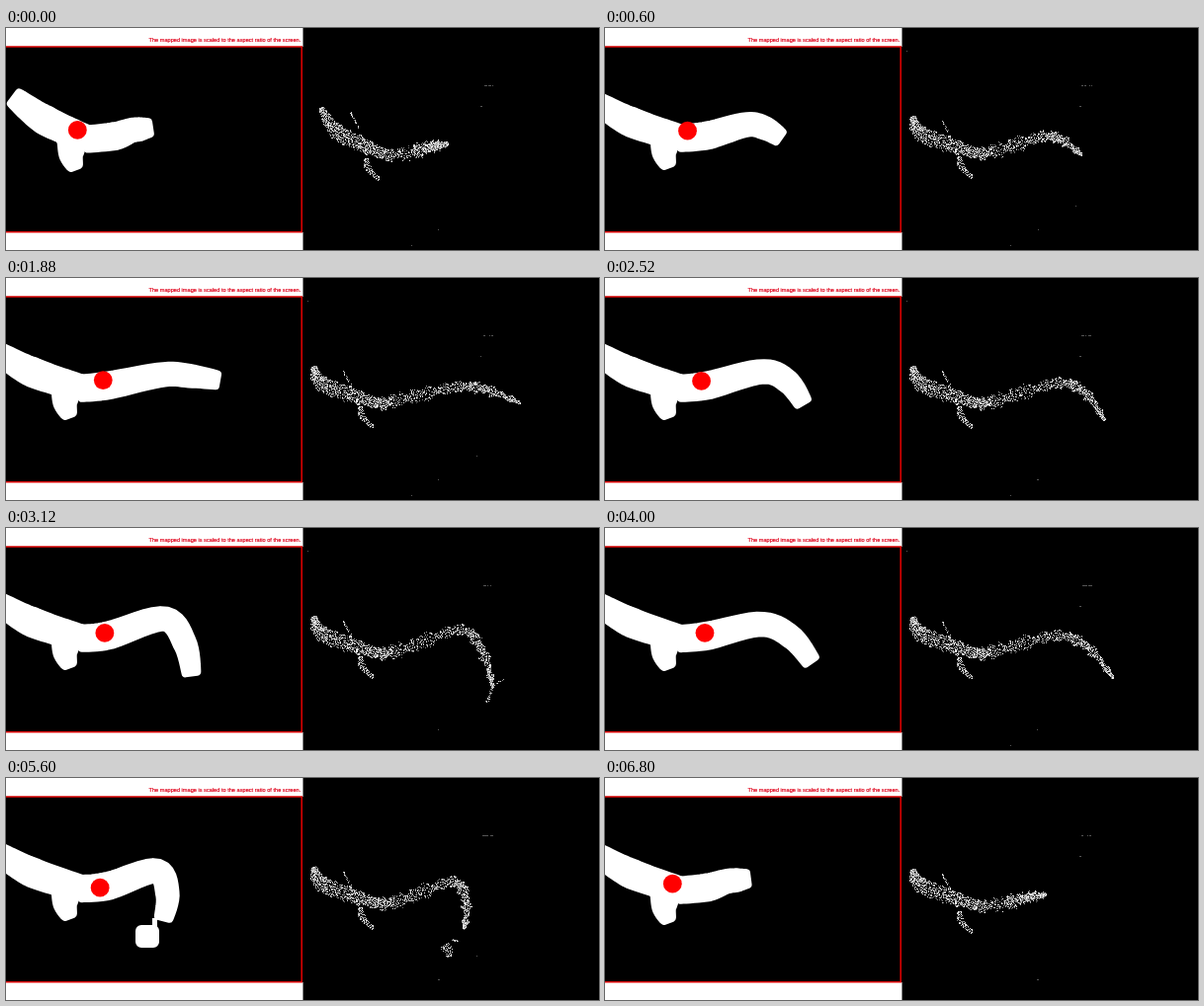
Animation, 600 px wide and 225 px high, one loop 6.84 s. Source, as an HTML page with a canvas:

```html
<!DOCTYPE html>
<html lang="en">
<head>
<meta charset="utf-8">
<title>Mapped silhouette and point cloud</title>
<style>
  html, body { margin: 0; width: 100%; height: 100%; overflow: hidden; background: #000; }
  canvas, svg { position: absolute; left: 0; top: 0; width: 600px; height: 225px; }
  text {
    font-family: "Liberation Sans", Arial, sans-serif; font-size: 5.63px;
    fill: #e0001a; stroke: #e0001a; stroke-width: 0.18px;
  }
</style>
</head>
<body>
<canvas id="stage" width="600" height="225"></canvas>
<svg viewBox="0 0 600 225">
  <path d="M0 19H299.2V206.8H0" fill="none" stroke="#d80000" stroke-width="1.6"/>
  <text x="298.3" y="13.7" text-anchor="end">The mapped image is scaled to the aspect ratio of the screen.</text>
</svg>
<script>
const LOOP = 6840, STEP = 40;
const ctx = document.getElementById('stage').getContext('2d', { willReadFrequently: true });

const POSES = [
  { t: 0, drop: 4, elbow: [126, 104], tip: [146, 101] },
  { t: 1200, drop: 0, elbow: [160, 92], tip: [210, 122] },
  { t: 1880, drop: 2, elbow: [158, 98], tip: [216, 104] },
  { t: 3120, drop: 2, elbow: [160, 92], tip: [188, 150] },
  { t: 4000, drop: 3, elbow: [158, 97.5], tip: [210, 137] },
  { t: 5600, drop: 3, elbow: [152, 94], tip: [159, 144] },
  { t: 6800, drop: 7, elbow: [122, 105], tip: [145, 102] }
];

const mix = (a, b, k) => a + (b - a) * k;
const mixPoint = (p, q, k) => [mix(p[0], q[0], k), mix(p[1], q[1], k)];
const shift = (p, dx, dy) => [p[0] + dx, p[1] + dy];
const clamp = v => Math.max(0, Math.min(1, v));

function random(seed) {
  return () => {
    seed = (seed + 0x6D2B79F5) | 0;
    let r = Math.imul(seed ^ (seed >>> 15), 1 | seed);
    r = (r + Math.imul(r ^ (r >>> 7), 61 | r)) ^ r;
    return ((r ^ (r >>> 14)) >>> 0) / 4294967296;
  };
}

// Catmull-Rom curve through the points, s from 0 to 1
function along(points, s) {
  const n = points.length - 1;
  const i = Math.min(n - 1, Math.floor(s * n));
  const k = s * n - i;
  const [a, b, c, d] = [-1, 0, 1, 2].map(j => points[Math.max(0, Math.min(n, i + j))]);
  return [0, 1].map(x => b[x] + 0.5 * k * (c[x] - a[x] +
    k * (2 * a[x] - 5 * b[x] + 4 * c[x] - d[x] + k * (3 * (b[x] - c[x]) + d[x] - a[x]))));
}

function widthAt(widths, s) {
  const n = widths.length - 1, i = Math.min(n - 1, Math.floor(s * n));
  return mix(widths[i], widths[i + 1], s * n - i);
}

// Point at s along a limb, pushed sideways by side half-widths
function beside({ spine, widths }, s, side) {
  const p = along(spine, s);
  const a = along(spine, Math.max(0, s - 0.02)), b = along(spine, Math.min(1, s + 0.02));
  const dx = b[0] - a[0], dy = b[1] - a[1], len = Math.hypot(dx, dy) || 1;
  const w = widthAt(widths, s) * side;
  return [p[0] + dy / len * w, p[1] - dx / len * w];
}

function poseAt(t) {
  let i = 0;
  while (i < POSES.length - 2 && t >= POSES[i + 1].t) i++;
  const a = POSES[i], b = POSES[i + 1];
  const u = clamp((t - a.t) / (b.t - a.t)), k = u * u * (3 - 2 * u);
  const start = clamp(1 - t / 500);
  const drop = mix(a.drop, b.drop, k);
  const elbow = mixPoint(a.elbow, b.elbow, k), tip = mixPoint(a.tip, b.tip, k);

  const shoulder = [mix(-10, 9, start), 74 + drop * 0.25 - start * 4];
  const neck = [76 + 6 * start, 111 + drop * 0.4];
  const foot = [64 + 6 * start, 137 + drop];

  // the forearm bows outwards as the tip falls below the elbow
  const dx = tip[0] - elbow[0], dy = tip[1] - elbow[1], len = Math.hypot(dx, dy);
  const bow = 8 * clamp(dy / 30) / len;
  const forearm = shift(mixPoint(elbow, tip, 0.5), dy * bow, -dx * bow);

  return {
    shoulder, neck, foot, tip,
    reach: clamp((tip[0] - 146) / 13),
    wing: { spine: [shoulder, shift(mixPoint(shoulder, neck, 0.42), 0, 5), neck], widths: [11, 15.5, 14] },
    leg: { spine: [shift(foot, -3, -25), shift(foot, -4, -12), foot], widths: [16, 12.5, 8] },
    arm: { spine: [neck, shift(neck, 28, -3), elbow, forearm, tip], widths: [14, 14.5, 12.7, 12.3, 9.5] },
    hand: t >= 5240 && t < 5880,
    strand: t >= 2800 && t < 3440
  };
}

const ROUND = 4;

function fillLimb({ spine, widths }) {
  const core = { spine, widths: widths.map(w => w - ROUND) };
  const end = 0.96, steps = 30;
  ctx.beginPath();
  for (const side of [1, -1])
    for (let i = 0; i <= steps; i++)
      ctx.lineTo(...beside(core, end * (side > 0 ? i : steps - i) / steps, side));
  ctx.closePath();
  ctx.fill();
  ctx.stroke();
}

function drawSilhouette(pose) {
  ctx.save();
  ctx.beginPath();
  ctx.rect(0, 19, 299, 188);
  ctx.clip();
  ctx.fillStyle = ctx.strokeStyle = '#fff';
  ctx.lineJoin = 'round';
  ctx.lineWidth = ROUND * 2;
  [pose.wing, pose.leg, pose.arm].forEach(fillLimb);
  if (pose.hand) {
    const [x, y] = pose.tip;
    ctx.beginPath();
    ctx.roundRect(x - 24, y + 9, 16, 15, 2);
    ctx.fill();
    ctx.stroke();
    ctx.fillRect(x - 11, y - 2, 5, 9);
  }
  ctx.restore();
}

// The red dot marks the centre of mass of the white pixels
function drawCentre() {
  const top = 21, wide = 297, high = 184;
  const data = ctx.getImageData(0, top, wide, high).data;
  let sx = 0, sy = 0, n = 0;
  for (let y = 0; y < high; y += 2)
    for (let x = 0; x < wide; x += 2)
      if (data[(y * wide + x) * 4] > 128) { sx += x; sy += y; n++; }
  ctx.fillStyle = '#f00';
  ctx.beginPath();
  ctx.arc(sx / n + 0.5, sy / n + top + 0.5, 9.4, 0, 7);
  ctx.fill();
}

function drawCloud(pose, tick) {
  const rnd = random(71), flicker = random(tick * 977 + 5);

  const speck = ([x, y]) => {
    const light = Math.round(mix(100, 255, rnd()));
    if (flicker() > 0.9) return;
    ctx.fillStyle = `rgb(${light},${light},${light})`;
    ctx.fillRect(Math.round(x), Math.round(y), 1, 1);
  };
  const scatter = (spine, widths, count, rough = 0) => {
    for (let i = 0; i < count; i++) {
      const s = rnd();
      const edge = 1 + rough * (Math.sin(s * 43) + Math.sin(s * 91 + 1));
      // half of the specks fall on fine lines along the limb
      const v = rnd() < 0.5 ? Math.floor(rnd() * 7) / 3 - 1 : rnd() * 2 - 1;
      speck(beside({ spine, widths }, s, v * edge));
    }
  };

  const { shoulder, neck, foot, wing, arm, tip, reach } = pose;
  const root = [315 + shoulder[0] * 0.4, 88 + 2.5 * (shoulder[1] - 74)];
  const map = p => shift(p, 301, 15);

  scatter([root, map(along(wing.spine, 0.4)), map(along(wing.spine, 0.7)), map(neck)],
    [2, 7, 7, 4.5], 1250, 0.1);
  scatter([shift(root, 30, 5), shift(root, 34, 13), shift(root, 39, 21)], [0.5, 1, 1], 28);
  scatter([shift(foot, 294, -9), shift(foot, 296, 1), shift(foot, 307, 12)], [2, 3, 1.5], 160);

  // depth lifts the bend of the arm and lengthens a far tip
  const far = (tip[0] - 146) * 0.1 - (tip[1] - 101) * 0.2;
  const points = [0, 1, 2, 3, 4].map(i => {
    const s = i / 4;
    return shift(along(arm.spine, s), 301 + reach * s ** 4 * 3,
      16 - 5 * reach * Math.sin(Math.PI * s) + far * s ** 4);
  });
  scatter(points, [5, 6, 4.5, 4, 1.2], Math.round(mix(900, 1250, reach)), 0.28);

  const end = points[4];
  if (pose.strand) {
    scatter([end, shift(end, -3, 8), shift(end, -6, 16)], [1, 1, 1], 45);
    scatter([end, shift(end, 6, -5), shift(end, 13, -9)], [1, 1, 0.5], 14);
  }
  if (pose.hand) {
    scatter([shift(end, -20, 16), shift(end, -17, 21), shift(end, -15, 28)], [4, 5, 2], 110);
    scatter([shift(end, -12, 11), shift(end, -5, 12)], [1, 1], 16);
  }

  ctx.fillStyle = '#555';
  for (const [x, y, w] of [[305, 23, 1], [482, 58, 11], [480, 79, 2], [476, 180, 1], [437, 204, 2], [410, 220, 1]])
    for (let i = 0; i < w; i++)
      if (flicker() < 0.65) ctx.fillRect(x + i, y, 1, 1);
}

function draw(tick) {
  const pose = poseAt(tick * STEP);
  ctx.fillStyle = '#000';
  ctx.fillRect(0, 0, 600, 225);
  ctx.fillStyle = '#fff';
  ctx.fillRect(0, 0, 300.5, 19);
  ctx.fillRect(0, 207, 300.5, 18);
  drawSilhouette(pose);
  drawCentre();
  drawCloud(pose, tick);
}

const begin = performance.now();
let shown = -1;
function loop() {
  const tick = Math.floor(((performance.now() - begin) % LOOP) / STEP);
  if (tick !== shown) draw(shown = tick);
  requestAnimationFrame(loop);
}
loop();
</script>
</body>
</html>
```
